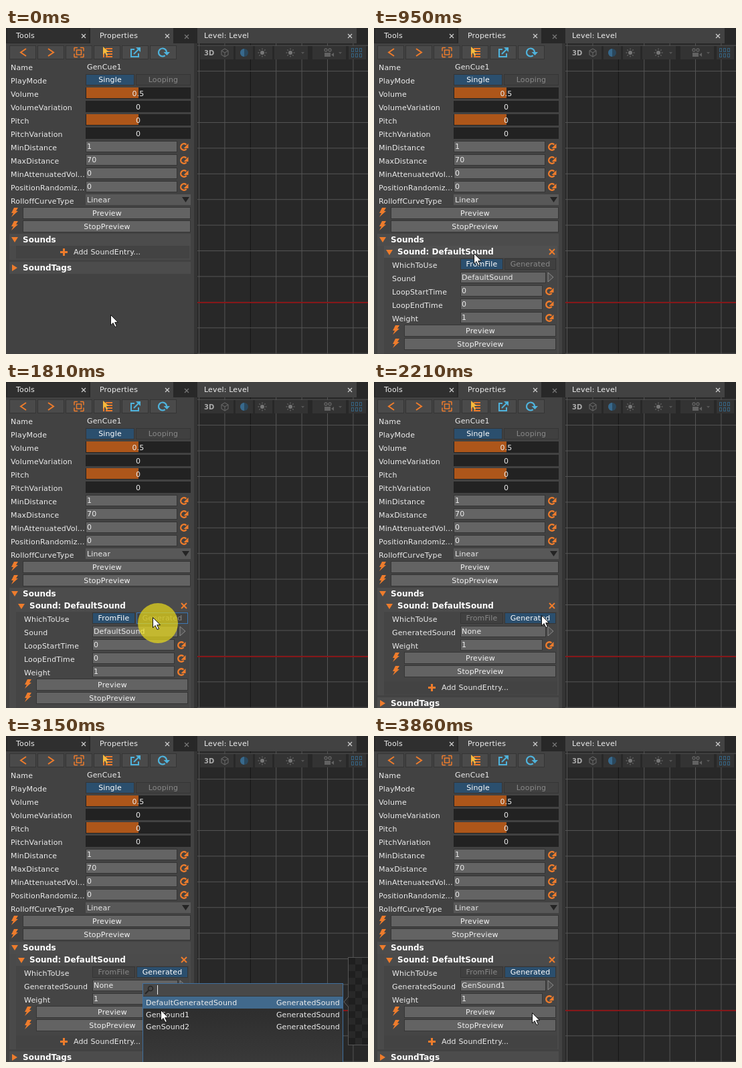
These frames come from a looping animation (541x488 px, 4100 ms). An HTML page with a canvas:

```html
<!DOCTYPE html>
<html lang="en">
<head>
<meta charset="utf-8">
<title>Sound cue editor</title>
<style>
html, body { margin: 0; width: 100%; height: 100%; overflow: hidden; background: #424242; }
canvas { display: block; }
</style>
</head>
<body>
<canvas id="stage" width="541" height="488"></canvas>
<script>
const c = document.getElementById('stage').getContext('2d');
const LOOP = 4100, STEP = 78;
const ORANGE = '#ee7c2c', BLUE = '#4fb3dc', NAVY = '#2b4f6e', WHITE = '#ececec';
const EDGE = '#353535', FOCUS = '#3d78b4';

// Pointer moves: start time, number of steps, end point
const START = [156, 429];
const MOVES = [
  [230, 6, 148, 341], [710, 1, 149, 337], [1180, 7, 219, 352], [1970, 4, 250, 349],
  [2280, 2, 209, 372], [2750, 6, 231, 410], [3230, 2, 236, 414]
];
const CLICKS = [[790, 950], [1730, 1890], [2590, 2670], [3540, 3700]];

function rect(x, y, w, h, color) {
  c.fillStyle = color;
  c.fillRect(x, y, w, h);
}

function frame(x, y, w, h, color) {
  c.strokeStyle = color;
  c.lineWidth = 1;
  c.strokeRect(x + .5, y + .5, w - 1, h - 1);
}

function box(x, y, w, h, color, edge = EDGE) {
  rect(x, y, w, h, color);
  frame(x, y, w, h, edge);
}

function text(s, x, y, color = WHITE, align = 'left') {
  c.font = '11px "DejaVu Sans", sans-serif';
  c.letterSpacing = '0.15px';
  c.textAlign = align;
  c.fillStyle = color;
  c.fillText(s, x, y);
}

function bold(s, x, y) {
  c.font = 'bold 12px "DejaVu Sans", sans-serif';
  c.letterSpacing = '0px';
  c.textAlign = 'left';
  c.fillStyle = '#fff';
  c.fillText(s, x, y);
}

function trace(points, closed) {
  c.beginPath();
  for (let i = 0; i < points.length; i += 2) c.lineTo(points[i], points[i + 1]);
  if (closed) c.closePath();
}

function fill(color, ...points) {
  trace(points, true);
  c.fillStyle = color;
  c.fill();
}

function line(color, width, ...points) {
  trace(points);
  c.strokeStyle = color;
  c.lineWidth = width;
  c.stroke();
}

function at(x, y, draw) {
  c.save();
  c.translate(x, y);
  draw();
  c.restore();
}

function cross(x, y, color, r = 3, width = 1.2) {
  line(color, width, x - r, y - r, x + r, y + r);
  line(color, width, x - r, y + r, x + r, y - r);
}

function arc(x, y, r, from, to, color, width) {
  c.beginPath();
  c.arc(x, y, r, from, to);
  c.strokeStyle = color;
  c.lineWidth = width;
  c.stroke();
}

function disc(x, y, r, color, from = 0, to = 7) {
  c.beginPath();
  c.arc(x, y, r, from, to);
  c.fillStyle = color;
  c.fill();
}

function reset(x, y) {
  arc(x, y, 4.8, .7, 5.5, ORANGE, 2.4);
  fill(ORANGE, x + 6.5, y - 5, x + 6.5, y + 2, x - .5, y + 2);
}

function bolt(x, y) {
  fill(ORANGE, x - 1, y - 7, x + 5, y - 7, x + 2, y - 2, x + 5, y - 2,
    x - 5, y + 7, x - 2, y + 1, x - 5, y + 1);
}

function expander(x, y, open) {
  if (open) fill(ORANGE, x - 5, y - 4, x + 5, y - 4, x, y + 4);
  else fill(ORANGE, x - 4, y - 5, x + 4, y, x - 4, y + 5);
}

function button(label, x, y, w) {
  box(x, y, w, 18, '#636363');
  text(label, x + w / 2 + .5, y + 13, '#f2f2f2', 'center');
}

function toggle(label, x, y, w, on, edge) {
  box(x, y, w, 17, on ? NAVY : '#404040', edge);
  text(label, x + w / 2, y + 12, on ? '#fff' : '#898989', 'center');
}

function field(value, x, y, w, focus) {
  box(x, y, w, 17, focus ? '#525252' : '#646464', focus ? FOCUS : EDGE);
  text(value, x + 2, y + 12);
}

function slider(value, y, part) {
  rect(119, y, 157, 17, '#222');
  rect(120, y, 156 * part, 16, '#ad561a');
  text(value, 197.5, y + 13, WHITE, 'center');
}

function header(label, y, open) {
  rect(5, y, 271, 18, '#4c4c4c');
  expander(13, y + 9, open);
  bold(label, 25, y + 13);
}

function addRow(y, hover) {
  rect(15, y, 259, 19, hover ? '#525252' : '#434343');
  rect(81, y + 8, 11, 3, ORANGE);
  rect(85, y + 4, 3, 11, ORANGE);
  text('Add SoundEntry...', 101, y + 13);
}

function toolbar() {
  for (let i = 0; i < 6; i++) box(5 + Math.round(i * 41.9), 26, 40, 21, '#4a4a4a');
  line(ORANGE, 2, 30, 31, 22, 36.5, 30, 42);
  line(ORANGE, 2, 63, 31, 71, 36.5, 63, 42);
  c.strokeStyle = ORANGE;
  c.lineWidth = 1.5;
  c.setLineDash([5, 4, 5, 0]);
  c.strokeRect(102, 29.5, 14, 14);
  c.setLineDash([]);
  c.strokeRect(105.5, 33, 7, 7);
  for (const y of [30, 34, 38, 42]) rect(149, y, 10, 2, ORANGE);
  rect(145, 30, 2, 14, ORANGE);
  fill('#f7b93c', 145, 28, 145, 40, 148, 37, 150, 42, 152, 41, 150, 36, 154, 36);
  line(BLUE, 2, 192, 32, 187, 32, 187, 43, 198, 43, 198, 38);
  line(BLUE, 2, 191, 39, 198, 32);
  fill(BLUE, 194, 29, 201, 29, 201, 36);
  arc(234, 36.5, 6, .9, 6.2, BLUE, 2.2);
  fill(BLUE, 235.5, 36, 245, 36, 240.5, 41);
}

function tabs() {
  rect(0, 0, 541, 23, '#282828');
  rect(2, 1, 122, 21, '#2f2f2f');
  rect(126, 0, 124, 24, '#424242');
  rect(286, 0, 238, 23, '#424242');
  text('Tools', 15, 15);
  text('Properties', 140, 15);
  text('Level: Level', 296, 15);
  cross(116, 12, '#ccc');
  cross(241, 12, '#ccc');
  cross(270, 13, '#777');
  cross(514, 12, '#ccc');
}

function viewIcons() {
  for (const [x, w] of [[290, 50], [343, 26], [372, 26], [401, 50], [458, 50], [512, 26]])
    rect(x, 27, w, 20, '#333');
  c.font = 'bold 10px "DejaVu Sans", sans-serif';
  c.textAlign = 'left';
  c.fillStyle = '#aaa';
  c.fillText('3D', 296, 41);
  line('#626262', 1.2, 327, 31, 332, 34, 332, 40, 327, 43, 322, 40, 322, 34, 327, 31);
  line('#626262', 1.2, 322, 34, 327, 37, 332, 34);
  line('#626262', 1.2, 327, 37, 327, 43);
  disc(356, 37, 6, '#2a485e');
  disc(356, 37, 6, '#38698c', 1.57, 4.71);
  for (const x of [383, 425]) at(x, 37, () => {
    arc(0, 0, 1.5, 0, 7, '#777', 3);
    for (let i = 0; i < 8; i++) {
      c.rotate(Math.PI / 4);
      line('#666', 1.3, 0, 4.5, 0, 6.5);
    }
  });
  fill('#555', 441, 36, 446, 36, 443.5, 39);
  rect(476, 37, 9, 6, '#626262');
  fill('#626262', 486, 40, 490, 37, 490, 43);
  arc(478, 33, 2, 0, 7, '#626262', 1.3);
  arc(484, 33, 2, 0, 7, '#626262', 1.3);
  fill('#555', 497, 36, 502, 36, 499.5, 39);
  for (let i = 0; i < 6; i++)
    frame(516 + i % 3 * 6, 30 + Math.floor(i / 3) * 8, 4, 6, '#35617f');
}

function level() {
  rect(281, 0, 5, 488, '#343434');
  rect(286, 23, 255, 465, '#282828');
  for (let i = 0; i < 7; i++) {
    const x = 288.5 + i * 38.4;
    line(i == 2 ? '#151515' : '#555', 1, x, 23, x, 488);
  }
  for (let i = 0; i < 13; i++) {
    const y = 26.2 + i * 38.42;
    line('#555', 1, 286, y, 541, y);
  }
  rect(286, 410, 255, 2, '#861719');
  viewIcons();
}

function properties() {
  rect(0, 23, 281, 465, '#424242');
  toolbar();
  ['Name', 'PlayMode', 'Volume', 'VolumeVariation', 'Pitch', 'PitchVariation', 'MinDistance',
    'MaxDistance', 'MinAttenuatedVol...', 'PositionRandomiz...', 'RolloffCurveType']
    .forEach((s, i) => text(s, 7, 63 + i * 20));
  text('GenCue1', 121, 62);
  toggle('Single', 119, 69, 73, true);
  toggle('Looping', 194, 69, 82, false);
  slider('0.5', 89, .5);
  slider('0', 109, 0);
  slider('0', 129, .5);
  slider('0', 149, 0);
  ['1', '70', '0', '0'].forEach((s, i) => {
    field(s, 119, 169 + i * 20, 137);
    reset(266, 178 + i * 20);
  });
  rect(119, 249, 157, 16, '#585858');
  text('Linear', 121, 261);
  fill('#242424', 263, 253, 274, 253, 268.5, 261);
  bolt(13, 276);
  button('Preview', 25, 268, 251);
  bolt(13, 296);
  button('StopPreview', 25, 288, 251);
}

function soundEntry(t) {
  const generated = t >= 1890;
  const picked = t >= 3700;
  const pressed = t >= 1730 && !generated;
  const focus = t >= 2590 && t < 2750;
  rect(5, 326, 271, 162, '#4a4a4a');
  rect(15, 326, 259, 162, '#454545');
  rect(15, 326, 259, 18, t < 1340 ? '#505050' : '#4b4b4b');
  expander(23, 336, true);
  bold('Sound: DefaultSound', 35, 339);
  cross(266, 335, ORANGE, 4, 2);
  text('WhichToUse', 27, 359);
  toggle('FromFile', 129, 345, 64, !generated);
  toggle('Generated', 195, 345, 77, generated, pressed ? FOCUS : EDGE);

  text(generated ? 'GeneratedSound' : 'Sound', 27, 379);
  field(!generated ? 'DefaultSound' : picked ? 'GenSound1' : 'None', 129, 365, 128, focus);
  if (focus) rect(131, 367, 1, 13, '#fff');
  fill('#505050', 260, 366, 268, 373, 260, 380);
  line('#8b8b8b', 1, 260, 366, 268, 373, 260, 380, 260, 366);

  const numbers = generated ? ['Weight'] : ['LoopStartTime', 'LoopEndTime', 'Weight'];
  let y = 385;
  for (const name of numbers) {
    text(name, 27, y + 14);
    field(name == 'Weight' ? '1' : '0', 129, y, 123);
    reset(262, y + 9);
    y += 20;
  }
  for (const label of ['Preview', 'StopPreview']) {
    bolt(33, y + 7);
    button(label, 45, y - 1, 227);
    y += 20;
  }
  if (generated) {
    addRow(448, false);
    rect(0, 469, 281, 19, '#424242');
    header('SoundTags', 472, false);
  }
}

function sounds(t) {
  header('Sounds', 308, true);
  if (t >= 950) return soundEntry(t);
  rect(5, 326, 271, 21, '#4a4a4a');
  addRow(326, t >= 630);
  header('SoundTags', 350, false);
}

function popup(t) {
  const shift = t >= 3230 ? 18 : 0;
  const shade = c.createLinearGradient(0, 390, 0, 488);
  shade.addColorStop(0, '#2b2b2b');
  shade.addColorStop(1, '#393939');
  rect(204, 370, 300, 118, shade);
  rect(205, 371, 298, 18, '#484848');
  rect(205, 390 + shift, 298, 18, '#41698c');
  frame(204, 370, 300, 119, '#3f6f9e');
  rect(205, 389, 298, 1, EDGE);
  arc(216, 378, 3.5, 0, 7, '#252525', 1.5);
  line('#252525', 2.2, 213, 381, 208, 386);
  rect(226, 373, 1, 14, '#eee');
  ['DefaultGeneratedSound', 'GenSound1', 'GenSound2'].forEach((s, i) => {
    text(s, 209, 403 + i * 18);
    text('GeneratedSound', 499, 403 + i * 18, WHITE, 'right');
  });

  const top = 331 + shift;
  rect(511, top, 30, 132, '#282828');
  for (let row = 0; row < 13; row++)
    for (let col = row % 2; col < 3; col += 2)
      rect(512 + col * 10, top + 1 + row * 10, 10, 10, '#1f1f1f');
  frame(511, top, 40, 132, '#555');
  fill('#282828', 512, top + 59, 505, top + 67, 512, top + 75);
  line('#666', 1, 512, top + 59, 505, top + 67, 512, top + 75);
}

function pointer(t) {
  let [x, y] = START;
  for (const [from, steps, endX, endY] of MOVES) {
    if (t < from) break;
    const p = Math.min(1, (Math.floor((t - from) / STEP) + 1) / steps);
    const e = p * p * (3 - 2 * p);
    x += (endX - x) * e;
    y += (endY - y) * e;
  }
  const beam = t >= 2360 && t < 2750;
  at(Math.round(x), Math.round(y), () => {
    if (CLICKS.some(([a, b]) => t >= a && t < b))
      disc(beam ? 0 : 8, beam ? 0 : 9, 30, 'rgba(240,225,25,.68)');
    if (beam) {
      rect(-1, -6, 1, 14, '#111');
      for (const end of [-7, 8]) {
        rect(-4, end, 3, 1, '#111');
        rect(0, end, 3, 1, '#111');
      }
      return;
    }
    trace([.5, .5, .5, 16, 4, 12.5, 7, 18.5, 9.5, 17.5, 6.7, 11.7, 11.5, 11.7], true);
    c.fillStyle = '#fff';
    c.fill();
    c.strokeStyle = '#111';
    c.lineWidth = 1;
    c.stroke();
  });
}

function draw() {
  const t = performance.now() % LOOP;
  level();
  properties();
  tabs();
  sounds(t);
  if (t >= 2750 && t < 3700) popup(t);
  pointer(t);
  requestAnimationFrame(draw);
}
draw();
</script>
</body>
</html>
```
